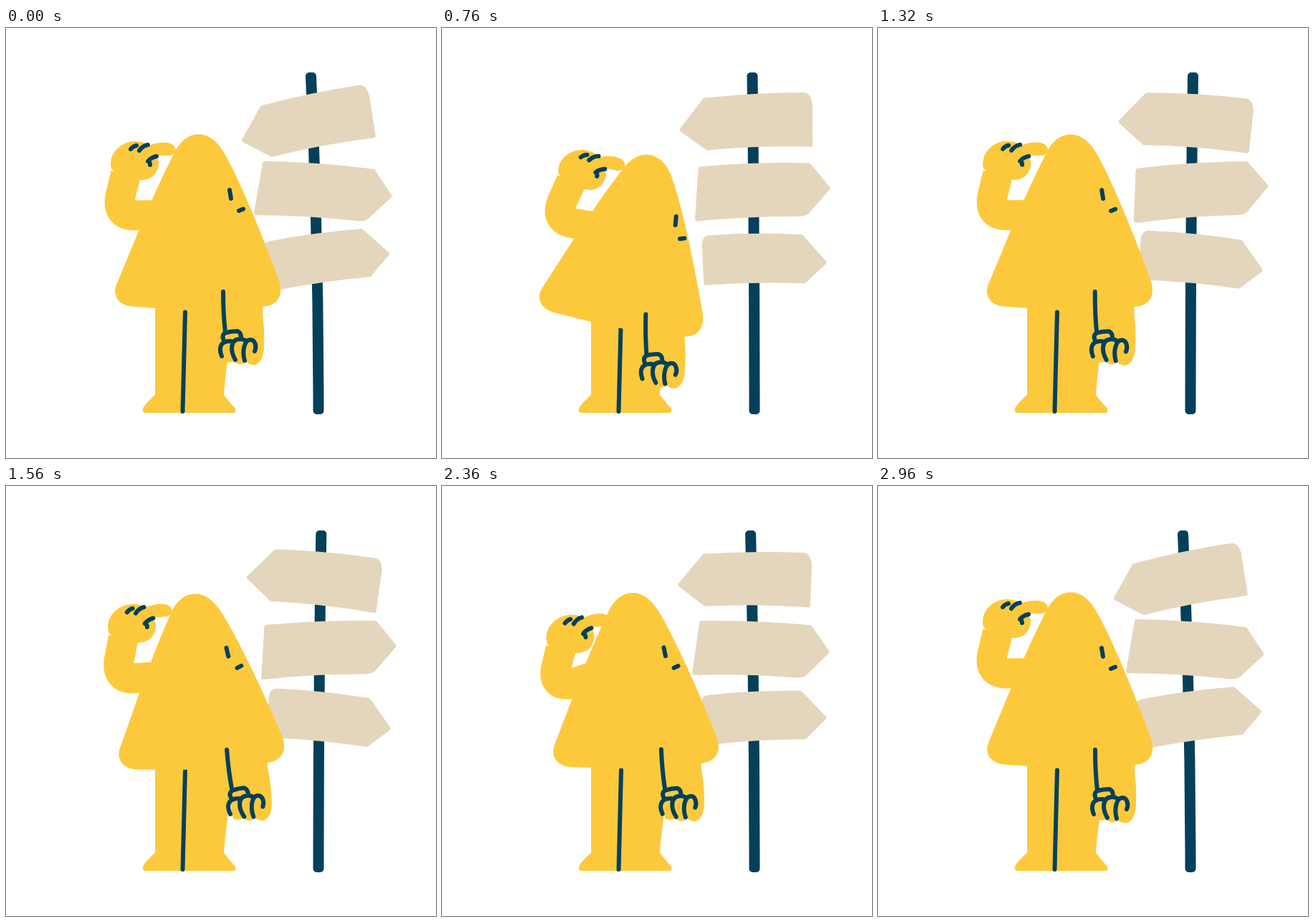
Animation, 600 px wide and 600 px high, one loop 3000 ms. Source, as an HTML page:

```html
<!DOCTYPE html>
<html lang="en">
<head>
<meta charset="utf-8">
<title>Which way?</title>
<style>
  html, body { margin: 0; width: 100%; height: 100%; overflow: hidden; background: #fff; }
  svg { display: block; width: 100vw; height: 100vh; }
  .pole { fill: #05405a; stroke: #05405a; stroke-width: 10; stroke-linejoin: round; }
  .sign { fill: #e4d6bc; stroke: #e4d6bc; stroke-width: 6; stroke-linejoin: round; }
  .skin { fill: #fdc93c; }
  .limb { fill: none; stroke: #fdc93c; stroke-width: 42; }
  .ink { fill: none; stroke: #05405a; stroke-width: 6; stroke-linecap: round; stroke-linejoin: round; }
</style>
</head>
<body>
<svg viewBox="0 0 600 600">
  <path id="pole" class="pole"/>
  <path id="sign1" class="sign" d="M-99.5 8L-66-32Q5-37 73-34Q80-33 81-20L79 36Q5 31-65 35Z"/>
  <path id="sign2" class="sign" d="M-73-33Q5-37 78.5-33L104 0L74 32Q70 35 62 35Q-10 32-80 37Z"/>
  <path id="sign3" class="sign" d="M-67.5 33L-69.5-20Q-69-30-62-30.5Q0-34 66.5-30L98 6.5L73 29Q71 32 69 32Q0 29-67.5 33Z"/>

  <path class="skin" d="M208 375V512C200 519 193 526 191 531Q190 537 195 537H316Q322 537 320 531Q312 522 304 512Q306 485 309 465L316 380Z"/>
  <path class="ink" d="M250 396.5L246.5 535"/>

  <g id="torso">
    <path class="skin" d="M180 389C160 389 146 375 155 356C185 284 205 232 236 172C252 141 284 140 303 172C325 208 362 300 380 350C389 374 378 388 358 389C310 396 250 394 180 389Z"/>
    <path id="raised" class="limb"/>

    <!-- hand on the forehead, origin at its first knuckle -->
    <g id="hand">
      <path class="skin" d="M-27 27C-32 7-14-11 6-11Q18-11 25-5L31-7C41-10 56-11 61-4C66 3 60 9 52 9H39Q35 9 39 17C40 31 31 44 13 43L-8 48Z"/>
      <path class="ink" d="M0 0Q3-4 8-5M12 2Q17-5 24-6M36 10Q28 12 24 17Q27 18 27 22"/>
    </g>

    <!-- hanging arm, origin at the shoulder -->
    <g id="arm">
      <path class="skin" d="M0 0L55 5V30Q58 55 57 75C57 95 48 104 40 102Q35 101 32 98Q28 102 22 101Q18 100 16 97Q10 100 2 97L0 90Z"/>
      <path class="ink" d="M0 0Q0 30 3 57M1 68Q-3 60 4 57Q12 55 20 55Q25 57 25 64M-2 90C-7 77-3 68 11 69M17 95C10 83 9 66 24 66Q29 66 32 69M30 96C26 82 30 67 38 67C45 67 47 77 44 83"/>
    </g>
    <path id="eyes" class="ink" d="M-1-6L1 6M12 23L18 20.5"/>
  </g>
</svg>
<script>
const LOOP = 3000, STEP = 40, SPAN = LOOP - STEP;
const { PI, cos, min, max } = Math;
const $ = id => document.getElementById(id);

const ease = u => (1 - cos(PI * min(1, max(0, u)))) / 2;

// Value that starts at 0 and eases to each goal in turn
const glide = (t, ...moves) => moves.reduce(
  (v, [from, to, goal]) => v + (goal - v) * ease((t - from) / (to - from)), 0);

const place = (id, x, y, deg) => $(id).setAttribute('transform', `translate(${x} ${y}) rotate(${deg})`);

function drawPost(t) {
  const a = 2 * PI * t / SPAN, bend = -3.3 - 7.2 * cos(a), top = 436 + bend;
  const at = y => 436 + bend * ((537 - y) / 474) ** 2;
  $('pole').setAttribute('d', `M433.5 534Q433.5 300 ${top - 2.5} 67h5Q438.5 300 438.5 534Z`);
  place('sign1', at(130), 130, -2.2 - 8.9 * cos(a - .35 + .35 * cos(a - 1)));
  place('sign2', at(227), 227, 4.1 * cos(a + .42 * (1 - cos(a))));
  place('sign3', at(322), 322, -1 - 6.9 * cos(a));
}

function drawFigure(t) {
  // The torso slumps, then leans the other way, then settles upright
  const lean = glide(t, [0, 500, 10.5], [980, 1480, -3], [1850, SPAN, 0]);
  const swing = glide(t, [0, 400, -2.4], [440, 1060, 5.6], [1080, 1560, -4.4], [1820, SPAN, 0]);
  const drop = glide(t, [1500, 2500, 20], [2600, SPAN, 0]);

  $('torso').setAttribute('transform',
    `translate(${-2.1 * lean} ${.22 * lean ** 2}) rotate(${lean} 265 390)`);
  place('eyes', 313 + .7 * lean, 232, .4 * lean);
  place('arm', 303, 368, swing - lean);
  place('hand', 174, 169 + drop, -.18 * drop);
  $('raised').setAttribute('d',
    `M167 ${204 + drop}L160 ${233 + .87 * drop}Q153 ${262 + .75 * drop} 181 ${261.5 + .6 * drop}L220 261`);
}

function frame() {
  const t = Math.floor(performance.now() % LOOP / STEP) * STEP;
  drawPost(t);
  drawFigure(t);
  requestAnimationFrame(frame);
}
frame();
</script>
</body>
</html>
```
